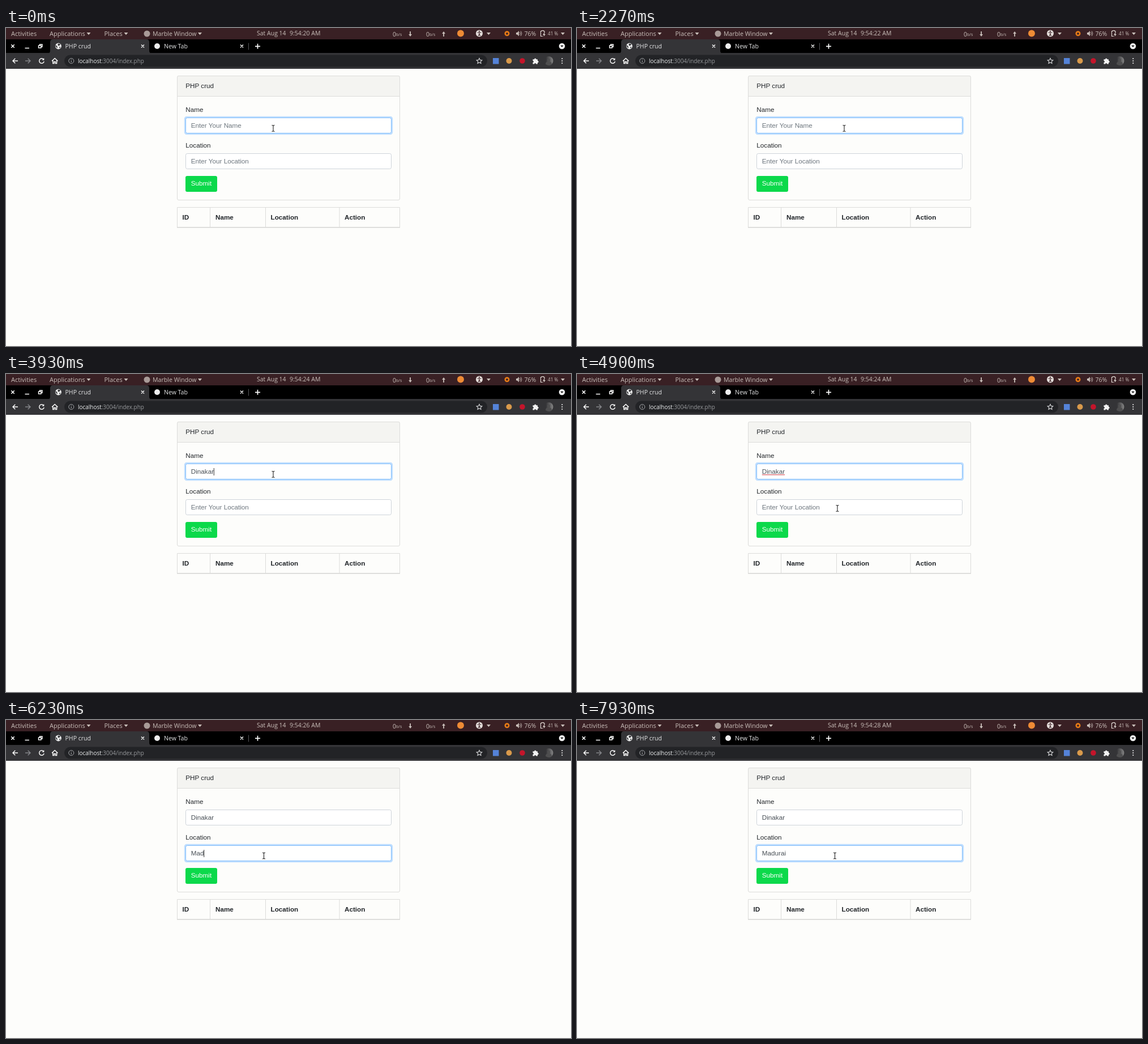
An HTML page that plays this animation: 998x561 px, repeating every 8000 ms.

```html
<!DOCTYPE html>
<html lang="en">
<head>
<meta charset="utf-8">
<title>PHP crud</title>
<style>
  html, body { margin: 0; width: 100%; height: 100%; overflow: hidden; background: #fdfdfb; }
  svg { display: block; width: 998px; height: 561px; }
  text { white-space: pre; }
  .bar { font: 11px "Open Sans", "Noto Sans", sans-serif; fill: #c9bfba; }
  .tab { font: 10.55px "Open Sans", "Noto Sans", sans-serif; fill: #e4e5e6; }
  .url { font: 9.95px "Open Sans", "Noto Sans", sans-serif; fill: #989a9d; }
  .page { font: 11.7px "Liberation Sans", Arial, sans-serif; fill: #212529; }
  .bold { font-weight: bold; }
  .line { fill: none; stroke: #fff; stroke-width: 1.4; }
  .edge { fill: none; stroke: #dcdcda; }
</style>
</head>
<body>
<svg viewBox="0 0 998 561">
  <rect width="998" height="561" fill="#fdfdfb"/>

  <!-- desktop bar -->
  <rect width="998" height="20" fill="#392024"/>
  <g class="bar">
    <text x="9" y="14">Activities</text>
    <text x="77" y="14">Applications</text>
    <text x="173.5" y="14">Places</text>
    <text x="259" y="14" font-size="10.6" style="font-size:10.6px">Marble Window</text>
    <text x="443" y="13.4" style="font-size:10.5px">Sat Aug 14</text>
    <text id="clock" x="501" y="13.4" style="font-size:10.5px">9:54:20 AM</text>
    <text x="683" y="14.5" style="font-size:10.5px">0<tspan font-size="7" dy="-1" style="font-size:7px">b/s</tspan></text>
    <text x="742" y="14.5" style="font-size:10.5px">0<tspan dy="-1" style="font-size:7px">b/s</tspan></text>
    <text x="915.5" y="14" style="font-size:10.6px">76%</text>
    <text x="957" y="13.4" style="font-size:8.2px">41 %</text>
  </g>
  <g fill="#c9bfba">
    <path id="drop" d="M142.5 8h7l-3.5 4.3z"/>
    <use href="#drop" x="66"/><use href="#drop" x="196.5"/>
    <use href="#drop" x="706.5"/><use href="#drop" x="837.5"/>
    <path d="M713.2 6h1.8v5h2l-2.9 4-2.9-4h2z"/>
    <path d="M772.2 15h1.8v-5h2l-2.9-4-2.9 4h2z"/>
    <path d="M901 8h2l3-3v9.500l-3-3h-2z"/>
    <path d="M907.5 7q2 2.700 0 5.400M909.200 5.500q3.200 4.200 0 8.400" fill="none" stroke="#c9bfba"/>
  </g>
  <circle cx="249" cy="10" r="5.500" fill="#a99b98"/>
  <circle cx="803" cy="9.500" r="6" fill="#ee8b35"/>
  <circle cx="836" cy="9.500" r="6" fill="#e6dfdc"/>
  <g fill="none" stroke="#392024" stroke-width="1.200">
    <path d="M832.500 8h7M836 8v3l-1.800 3M836 11l1.800 3"/>
    <circle cx="836" cy="5.800" r=".5"/>
  </g>
  <circle cx="885" cy="9.800" r="3.200" fill="none" stroke="#e77b16" stroke-width="2.600"/>
  <path d="M945.500 5.500h1v-1h3v1h1.500v4M948 14.500h-3.500v-9h1" fill="none" stroke="#ddd5d0" stroke-width="1.200"/>
  <path d="M951 8.500l-3 3.500h2l-.5 3 3.500-4h-2z" fill="#ddd5d0"/>

  <!-- tab strip -->
  <rect y="20" width="998" height="25" fill="#000"/>
  <path d="M73 45q5 0 5-5V25q0-5 5-5H248q5 0 5 5v15q0 5 5 5z" fill="#343437"/>
  <g class="line">
    <path d="M9.300 29.300l5.400 5.400m0-5.400l-5.400 5.400M33.500 35.500h7.500" stroke-width="1.600"/>
    <path d="M57.500 31h4.500v4h-4.500zM59.500 31v-2h4.500v4h-2"/>
    <path d="M239 29.500l5 5m0-5l-5 5M414 29.500l5 5m0-5l-5 5"/>
    <path d="M440 32.300h9M444.500 27.800v9" stroke-width="1.700"/>
  </g>
  <path d="M428.500 26.500v12" stroke="#55565a"/>
  <circle cx="92.500" cy="32" r="5.400" fill="#eceded"/>
  <path d="M88 30l2.500 2.500.3 3-1-.5-2.300-3zM92 27.500l4 .8-1 2.300-2.200 1-1.500-1.500zM94 33l2.500.7-2 2.300z" fill="#343437"/>
  <circle cx="267" cy="32" r="5" fill="#eee"/>
  <text class="tab" x="104.500" y="36">PHP crud</text>
  <text class="tab" x="279" y="36">New Tab</text>
  <circle cx="982" cy="32" r="5.300" fill="#f1f1f1"/>
  <path d="M979.300 30.700h5.400l-2.700 3z" fill="#111"/>

  <!-- toolbar -->
  <rect y="44" width="998" height="28" fill="#343437"/>
  <rect x="103" y="47.500" width="747" height="21" rx="10.500" fill="#222326"/>
  <g class="line">
    <path d="M21 58H12m4.300-4.300L12 58l4.300 4.300"/>
    <path d="M34 58h9m-4.300-4.300L43 58l-4.300 4.300" stroke="#85868a"/>
    <path d="M66.300 55.200A4.300 4.300 0 1 0 67.200 59"/>
    <path d="M67.300 53v3.700h-3.700z" fill="#fff" stroke="none"/>
    <path d="M81 58.300l5.200-4.800 5.200 4.800M82.800 57.500v5h2.200v-3h2.400v3h2.200v-5"/>
    <circle cx="115.300" cy="58" r="4.500" stroke="#a5a7aa" stroke-width="1"/>
    <path d="M115.300 57.500v3M115.300 55.200v1.100" stroke="#a5a7aa" stroke-width="1.100"/>
    <path d="M836 53.300l1.400 3.100 3.400.4-2.500 2.300.7 3.300-3-1.700-3 1.700.7-3.300-2.500-2.300 3.400-.4z" stroke="#d5d6d8" stroke-width="1.100"/>
  </g>
  <text class="url" x="127" y="61.500"><tspan fill="#eef0f1">localhost</tspan>:3004/index.php</text>
  <rect x="860" y="53" width="10.500" height="10.500" fill="#5483d8"/>
  <circle cx="888.500" cy="58" r="5" fill="#d99a4b"/>
  <circle cx="912" cy="58" r="4.800" fill="#c5152b"/>
  <path d="M930.500 55.200h2.600a1.700 1.700 0 1 1 3.400 0h2.500v2.600a1.700 1.700 0 1 1 0 3.400v2.300h-2.700a1.500 1.500 0 1 0-3 0h-2.800v-2.800a1.500 1.500 0 1 0 0-3z" fill="#f2f2f2"/>
  <linearGradient id="photo"><stop offset=".2" stop-color="#343437"/><stop offset="1" stop-color="#858585"/></linearGradient>
  <circle cx="958.500" cy="58" r="8" fill="url(#photo)"/>
  <path d="M953 64q0-4.500 4-5a2.800 2.800 0 1 1 3 0q4 .5 4 5-5 3.500-11 0z" fill="#4e4e4f"/>
  <g fill="#f2f2f2"><circle cx="982.300" cy="54" r="1.100"/><circle cx="982.300" cy="58" r="1.100"/><circle cx="982.300" cy="62" r="1.100"/></g>

  <!-- form card -->
  <rect x="302.500" y="84.500" width="393" height="36" fill="#f4f4f1"/>
  <rect class="edge" x="302.500" y="84.500" width="393" height="219" rx="2.500"/>
  <path class="edge" d="M302.500 120.500h393"/>
  <g class="page">
    <text x="317.300" y="106">PHP crud</text>
    <text x="317.300" y="147.700">Name</text>
    <text x="317.300" y="210.500">Location</text>
  </g>
  <g id="fields"></g>
  <rect x="317" y="261" width="56" height="28" rx="3" fill="#0cd94b"/>
  <text class="page" x="326.800" y="278.300" style="fill:#fff">Submit</text>

  <!-- table -->
  <path class="edge" d="M302.500 352V316.500h393V352M360.500 316v36M458.500 316v36M589 316v36"/>
  <path d="M302 351.800h394" stroke="#d5d5d3" stroke-width="1.400"/>
  <g class="page bold">
    <text x="311.500" y="337.600">ID</text>
    <text x="370" y="337.600">Name</text>
    <text x="467.500" y="337.600">Location</text>
    <text x="598" y="337.600">Action</text>
  </g>

  <g id="mouse" fill="none">
    <path d="M-2.500-5.500q2 0 2.500 1 .5-1 2.500-1M0-4.500v9M-2.500 5.500q2 0 2.500-1 .5 1 2.500 1" stroke="#fff" stroke-width="2.600"/>
    <path d="M-2.500-5.500q2 0 2.500 1 .5-1 2.500-1M0-4.500v9M-2.500 5.500q2 0 2.500-1 .5 1 2.500 1" stroke="#222" stroke-width="1.100"/>
  </g>
</svg>
<script>
const LOOP = 8000, CLICK = 5070, FADE = 150, BLINK = 500;
const INPUT_X = 326.8;

const get = id => document.getElementById(id);
const clamp = v => Math.min(1, Math.max(0, v));
const mix = (a, b, k) => a + (b - a) * k;

// keys: the time each letter appears; wake: times the caret restarts its blink
const FIELDS = [
  { y: 158, hint: "Enter Your Name", value: "Dinakar",
    keys: [2370, 3170, 3300, 3470, 3600, 3730, 3930], wake: [-630] },
  { y: 221, hint: "Enter Your Location", value: "Madurai",
    keys: [5830, 6030, 6230, 6530, 6670, 6870, 7030], wake: [5230] }
];
const MOUSE = [[4400, 472, 177], [4700, 463, 226], [4900, 460, 237], [5050, 455.5, 239.5]];
const MISSPELT = [4300, CLICK];

function add(parent, tag, attrs) {
  const el = document.createElementNS("http://www.w3.org/2000/svg", tag);
  for (const name in attrs) el.setAttribute(name, attrs[name]);
  return parent.appendChild(el);
}

for (const f of FIELDS) {
  const root = get("fields");
  f.glow = add(root, "rect", { x: 314.8, y: f.y - 2.2, width: 368.4, height: 32.4, rx: 4.5, fill: "#bfdeff" });
  f.box = add(root, "rect", { x: 317.5, y: f.y + 0.5, width: 363, height: 27, rx: 2.8, fill: "#fff" });
  f.text = add(root, "text", { class: "page", x: INPUT_X, y: f.y + 18 });
  f.line = add(root, "path", { stroke: "#d0343c", "stroke-width": 1 });
  f.caret = add(root, "rect", { y: f.y + 8, width: 1, height: 13, fill: "#333" });
}

function drawField(f, focus, t) {
  const count = f.keys.filter(k => k <= t).length;
  const width = (f.text.textContent = f.value.slice(0, count)) ? f.text.getComputedTextLength() : 0;
  if (!count) f.text.textContent = f.hint;
  f.text.style.fill = count ? "#495057" : "#6c757d";

  f.glow.style.opacity = focus;
  const rgb = [[206, 128], [212, 189], [218, 250]].map(([a, b]) => Math.round(mix(a, b, focus)));
  f.box.setAttribute("stroke", `rgb(${rgb})`);

  const active = f === FIELDS[t < CLICK ? 0 : 1];
  const wake = Math.max(...[...f.wake, ...f.keys].filter(k => k <= t));
  const lit = active && Math.floor((t - wake) / BLINK) % 2 === 0;
  f.caret.setAttribute("x", INPUT_X + width - 0.3);
  f.caret.style.display = lit ? "" : "none";

  const marked = f === FIELDS[0] && t >= MISSPELT[0] && t < MISSPELT[1];
  f.line.setAttribute("d", marked ? `M${INPUT_X} ${f.y + 19.8}h${width}` : "");
}

function mouseAt(t) {
  const next = MOUSE.findIndex(p => p[0] > t);
  if (next === 0) return MOUSE[0].slice(1);
  if (next < 0) return MOUSE[MOUSE.length - 1].slice(1);
  const [a, b] = [MOUSE[next - 1], MOUSE[next]];
  const k = (t - a[0]) / (b[0] - a[0]);
  return [mix(a[1], b[1], k), mix(a[2], b[2], k)];
}

function draw(t) {
  get("clock").textContent = `9:54:${20 + Math.floor((t + 70) / 1000)} AM`;
  const shift = clamp((t - CLICK) / FADE);
  drawField(FIELDS[0], 1 - shift, t);
  drawField(FIELDS[1], shift, t);
  get("mouse").setAttribute("transform", `translate(${mouseAt(t)})`);
}

const start = performance.now();
function tick() {
  draw((performance.now() - start) % LOOP);
  requestAnimationFrame(tick);
}
tick();
</script>
</body>
</html>
```
